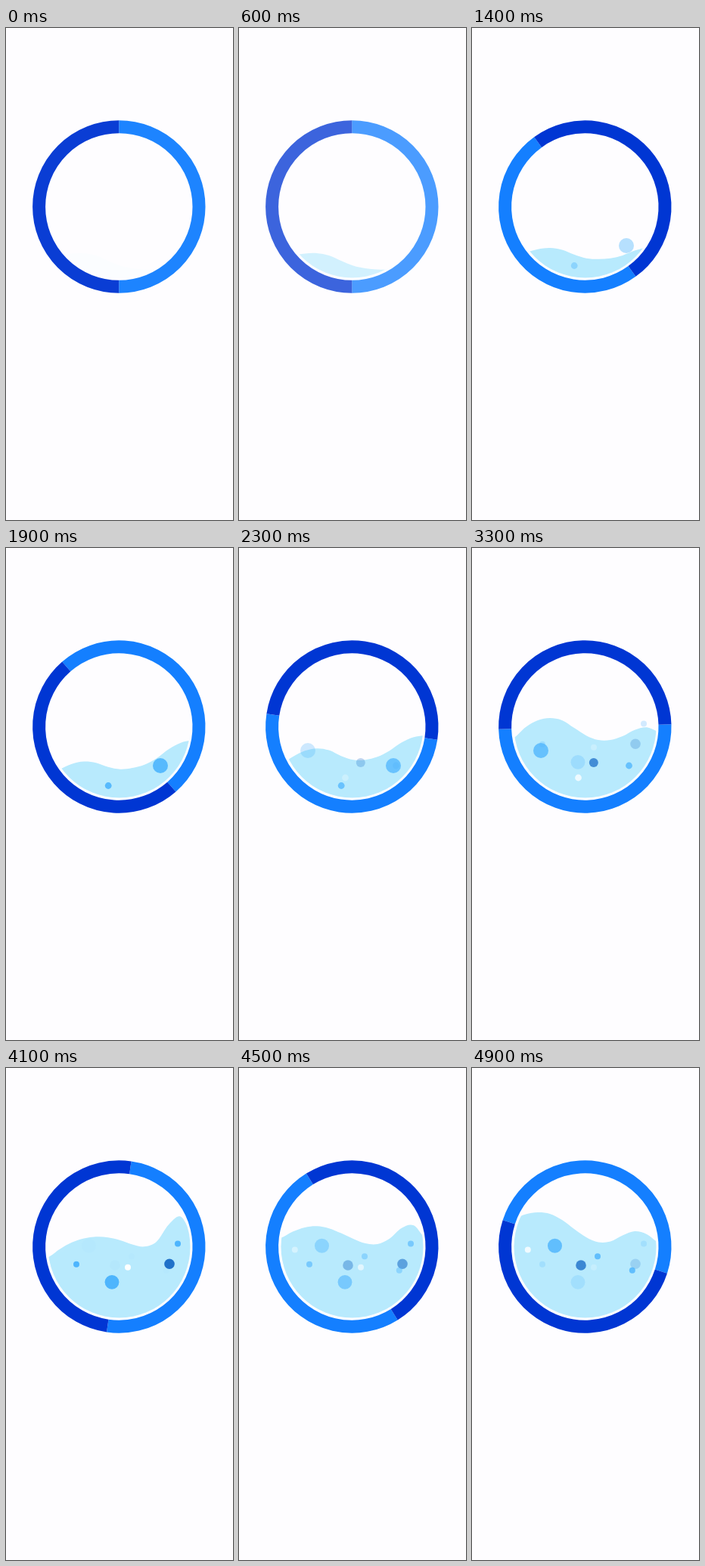
These frames come from a looping animation (300 px wide and 651 px high, 5 s). An HTML page with a canvas:

```html
<!DOCTYPE html>
<html>
<head>
<meta charset="utf-8">
<style>
html, body { margin: 0; width: 100%; height: 100%; overflow: hidden; background: #fefdff; }
canvas { display: block; }
</style>
</head>
<body>
<canvas id="stage" width="300" height="651"></canvas>
<script>
const ctx = document.getElementById('stage').getContext('2d');
const CX = 149.3, CY = 236.5, TAU = 2 * Math.PI;
const BLUE = '#4bb3fd', NAVY = '#1c6ec8', WHITE = '#fff';

// Surface heights per state, sampled every 16 px from x = 55
const X0 = 55, STEP = 16;
const waves = [
  [304, 301, 298.5, 298, 301, 308, 314.5, 318, 319.5, 319.5, 318, 317, 316],
  [299.7, 291.7, 284, 280.5, 282, 287.5, 289.9, 287.5, 282.5, 273, 259.5, 250, 246.9],
  [250.7, 235.7, 226.7, 224.5, 229.3, 242.5, 254.7, 260.8, 259.8, 255.3, 251.7, 250.7, 250.7],
  [252, 241, 232, 226.5, 224, 224.5, 228, 233.5, 236.5, 230, 207, 196, 220],
  [185.8, 181.6, 180.8, 184.6, 195.3, 210.1, 223, 229.8, 227.8, 219.4, 218.3, 226, 233.8]
];

// Bubbles per state: x, y, radius, colour
const bubbles = [
  [],
  [[204, 288, 10, BLUE], [135.2, 314.5, 4.4, BLUE]],
  [[91, 268, 10, BLUE], [160.8, 284, 6, NAVY], [140.5, 304, 4.4, WHITE], [207.5, 288, 4.4, BLUE]],
  [[140, 283.3, 9.4, BLUE], [161, 263.8, 4, WHITE], [216, 259.2, 6.8, NAVY],
   [227, 232.4, 4, BLUE], [93, 259.7, 4, BLUE]],
  [[109.5, 235.3, 9.5, BLUE], [144, 261, 6.8, NAVY], [166, 249.3, 4, BLUE],
   [211.8, 267.8, 4, BLUE], [73.8, 240.6, 4, WHITE]]
];

function drawRing(turn, alpha) {
  ctx.globalAlpha = alpha;
  ctx.lineWidth = 17;
  ['#147fff', '#0036d3'].forEach((color, i) => {
    const start = TAU * (turn - 0.25 + i / 2);
    ctx.strokeStyle = color;
    ctx.beginPath();
    ctx.arc(CX, CY, 105.7, start, start + Math.PI);
    ctx.stroke();
  });
}

function drawWater(y, alpha) {
  const at = i => y[Math.max(0, Math.min(y.length - 1, i))];
  const slope = i => (at(i + 1) - at(i - 1)) / 6;
  ctx.save();
  ctx.beginPath();
  ctx.arc(CX + 0.2, CY, 94, 0, TAU);
  ctx.clip();
  ctx.globalAlpha = alpha;
  ctx.fillStyle = '#b8eafd';
  ctx.beginPath();
  ctx.moveTo(X0, 340);
  ctx.lineTo(X0, y[0]);
  for (let i = 1; i < y.length; i++) {
    const x = X0 + STEP * i;
    ctx.bezierCurveTo(x - STEP * 2 / 3, y[i - 1] + slope(i - 1),
                      x - STEP / 3, y[i] - slope(i), x, y[i]);
  }
  ctx.lineTo(X0 + STEP * (y.length - 1), 340);
  ctx.fill();
  ctx.restore();
}

function drawBubbles(list, alpha) {
  ctx.globalAlpha = alpha;
  for (const [x, y, r, color] of list) {
    ctx.fillStyle = color;
    ctx.beginPath();
    ctx.arc(x, y, r, 0, TAU);
    ctx.fill();
  }
}

function draw(t) {
  const progress = 0.04 + t * 0.0009714;
  const step = Math.floor(progress), f = progress - step;
  const intro = step === 0;
  const from = Math.max(0, step - 1);

  ctx.globalAlpha = 1;
  ctx.fillStyle = '#fefdff';
  ctx.fillRect(0, 0, 300, 651);

  // The first step cross-dissolves two equal rings; later steps spin one turn each
  drawRing(intro ? 0 : f, intro ? 1 - f * (1 - f) : 1);
  const surface = waves[from].map((y, i) => y + (waves[step][i] - y) * f);
  drawWater(surface, intro ? f : 1);
  drawBubbles(bubbles[from], 1 - f);
  drawBubbles(bubbles[step], f);
}

const begin = performance.now();
function tick() {
  const t = (performance.now() - begin) % 5000;
  draw(Math.floor(t / 100) * 100);
  requestAnimationFrame(tick);
}
tick();
</script>
</body>
</html>
```
